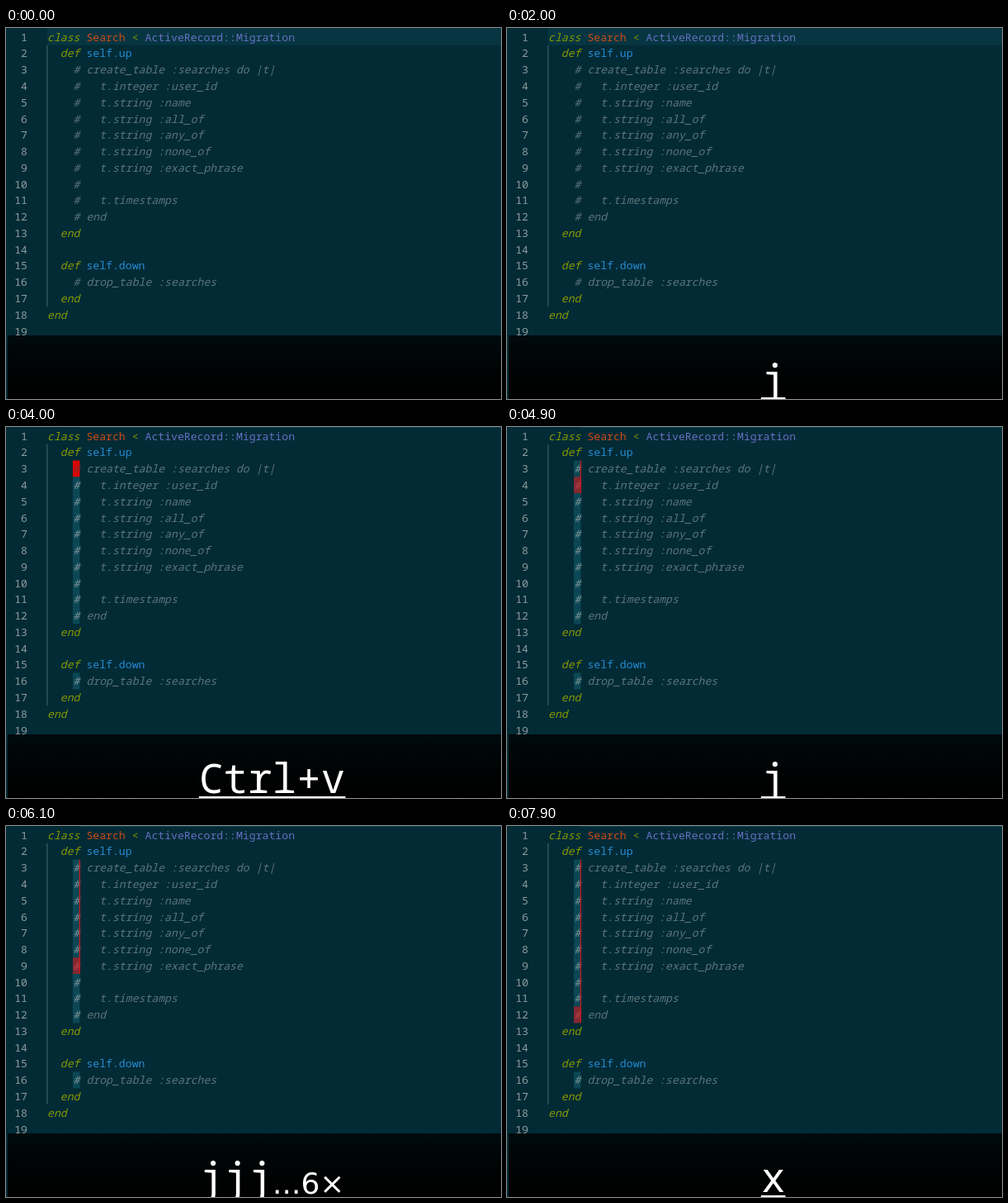
These frames come from a looping animation (600x449 px, 8000 ms). An HTML page:

```html
<!DOCTYPE html>
<html lang="en">
<head>
<meta charset="utf-8">
<title>Block selection</title>
<style>
html, body { margin: 0; width: 100%; height: 100%; overflow: hidden; background: #022b36; }
svg { display: block; width: 100vw; height: 100vh; }
text { white-space: pre; font-family: "Noto Sans Mono", "DejaVu Sans Mono", monospace; }
#code text { font-size: 13.17px; }
.num { fill: #8c9b9d; text-anchor: end; }
.key { fill: #859900; font-style: italic; }
.op { fill: #859900; }
.type { fill: #cb4b16; }
.base { fill: #656fc0; }
.name { fill: #268bd2; }
.note { fill: #5b757b; font-style: italic; }
#keys { font-size: 49.3px; fill: #fff; }
#count { font-family: "DejaVu Sans", sans-serif; font-size: 36px; fill: #fff; }
</style>
</head>
<body>
<svg viewBox="0 0 600 449">
  <defs>
    <linearGradient id="shade" x1="0" y1="0" x2="0" y2="1">
      <stop offset="0" stop-color="#010a0d"/>
      <stop offset=".45" stop-color="#000405"/>
      <stop offset="1" stop-color="#000"/>
    </linearGradient>
  </defs>
  <rect width="600" height="449" fill="#022b36"/>
  <rect x="90" width="510" height="1" fill="#0a4250"/>
  <rect id="line" x="50" width="550" height="20.5" fill="#073642"/>
  <g id="cells"></g>
  <path d="M49.9 21V337" stroke="#426a70" stroke-width="1"/>
  <g id="code"></g>
  <path id="edge" stroke="#c51a20" stroke-width="1.3"/>
  <rect x="2" y="372" width="598" height="77" fill="url(#shade)"/>
  <text id="keys" y="442.5"></text>
  <text id="count" y="445"></text>
  <rect id="underline" y="447" height="2" fill="#fff"/>
</svg>
<script>
const LOOP = 8000, ROW = 19.77, COL = 7.9, LEFT = 50, KEY_W = 29.6, CENTER = 322.7;
const UNDERLINE_MS = 380, LAG = 100, BLOCK_LAG = 50, BLOCK_AT = 3950, FIRST_ROW = 3;
const NS = "http://www.w3.org/2000/svg";
const $ = id => document.getElementById(id);

const source = `class Search < ActiveRecord::Migration
  def self.up
    # create_table :searches do |t|
    #   t.integer :user_id
    #   t.string :name
    #   t.string :all_of
    #   t.string :any_of
    #   t.string :none_of
    #   t.string :exact_phrase
    #
    #   t.timestamps
    # end
  end

  def self.down
    # drop_table :searches
  end
end
`.split("\n");

const rules = [
  [/^#.*/, "note"], [/^(class|def|end)\b/, "key"], [/^</, "op"],
  [/^Search/, "type"], [/^Active\S+/, "base"], [/^self\.\w+/, "name"]
];

// Key presses: time, key, and whether it starts a new caption.
const presses = [
  [1950, "j", true], [2350, "j"], [2800, "w"],
  [3850, "Ctrl+v", true],
  [4800, "j", true], [5100, "j"], [5400, "j"],
  [5650, "j"], [5850, "j"], [6000, "j"], [6150, "j"], [6300, "j"], [6420, "j"],
  [7800, "x", true]
];

function set(el, attrs) {
  for (const k in attrs) el.setAttribute(k, attrs[k]);
}

function add(parent, tag, attrs, content = "") {
  const el = document.createElementNS(NS, tag);
  set(el, attrs);
  el.textContent = content;
  return parent.appendChild(el);
}

const rowTop = row => 1 + (row - 1) * ROW;
const cells = [];

function addToken(row, col, word, kind) {
  const x = LEFT + col * COL, y = rowTop(row) + 14.7;
  const el = add($("code"), "text", { x, y, class: kind });
  if (kind !== "note") {
    el.textContent = word;
    return;
  }
  const mark = add(el, "tspan", {}, "#");
  add(el, "tspan", {}, word.slice(1));
  const rect = add($("cells"), "rect", { x: 81, y: rowTop(row), width: 8.4, height: ROW + .2 });
  cells.push({ row, mark, rect });
}

source.forEach((text, i) => {
  add($("code"), "text", { x: 26, y: rowTop(i + 1) + 14.7, class: "num" }, i + 1);
  for (let col = 0; col < text.length;) {
    const rest = text.slice(col);
    const rule = rules.find(([re]) => re.test(rest));
    const word = rule ? rest.match(rule[0])[0] : " ";
    if (rule) addToken(i + 1, col, word, rule[1]);
    col += word.length;
  }
});

function drawCaption(t) {
  const done = presses.filter(p => p[0] <= t);
  const start = done.map(p => !!p[2]).lastIndexOf(true);
  const caption = start < 0 ? [] : done.slice(start);
  const many = caption.length > 3;
  const shown = caption.slice(0, 3).map(p => p[1]).join("");
  const keysW = shown.length * KEY_W;
  const left = CENTER - (keysW + (many ? 88 : 0)) / 2;
  $("keys").textContent = shown;
  $("keys").setAttribute("x", left);
  $("count").textContent = many ? `...${caption.length}×` : "";
  $("count").setAttribute("x", left + keysW);

  const last = caption[caption.length - 1];
  const fresh = last && !many && t - last[0] < UNDERLINE_MS;
  const w = fresh ? last[1].length * KEY_W : 0;
  set($("underline"), { x: left + keysW - w, width: w });
}

function drawEditor(t) {
  const block = t >= BLOCK_AT;
  const lag = block ? BLOCK_LAG : LAG;
  const row = 1 + presses.filter(p => p[1] === "j" && p[0] + lag <= t).length;
  const single = row === FIRST_ROW;
  set($("line"), { y: rowTop(row) - 1, visibility: block ? "hidden" : "visible" });
  for (const cell of cells) {
    const cursor = cell.row === row;
    set(cell.rect, {
      visibility: block ? "visible" : "hidden",
      fill: !cursor ? "#0c4755" : single ? "#dc0505" : "#852832"
    });
    cell.mark.style.fill = !block ? "" : !cursor ? "#7d9398" : single ? "#8d2926" : "#b34047";
  }
  const edge = block && !single;
  $("edge").setAttribute("d", edge ? `M89.3 ${rowTop(FIRST_ROW)}V${rowTop(row + 1)}` : "");
}

function frame(now) {
  const t = now % LOOP;
  drawCaption(t);
  drawEditor(t);
  requestAnimationFrame(frame);
}
requestAnimationFrame(frame);
</script>
</body>
</html>
```
